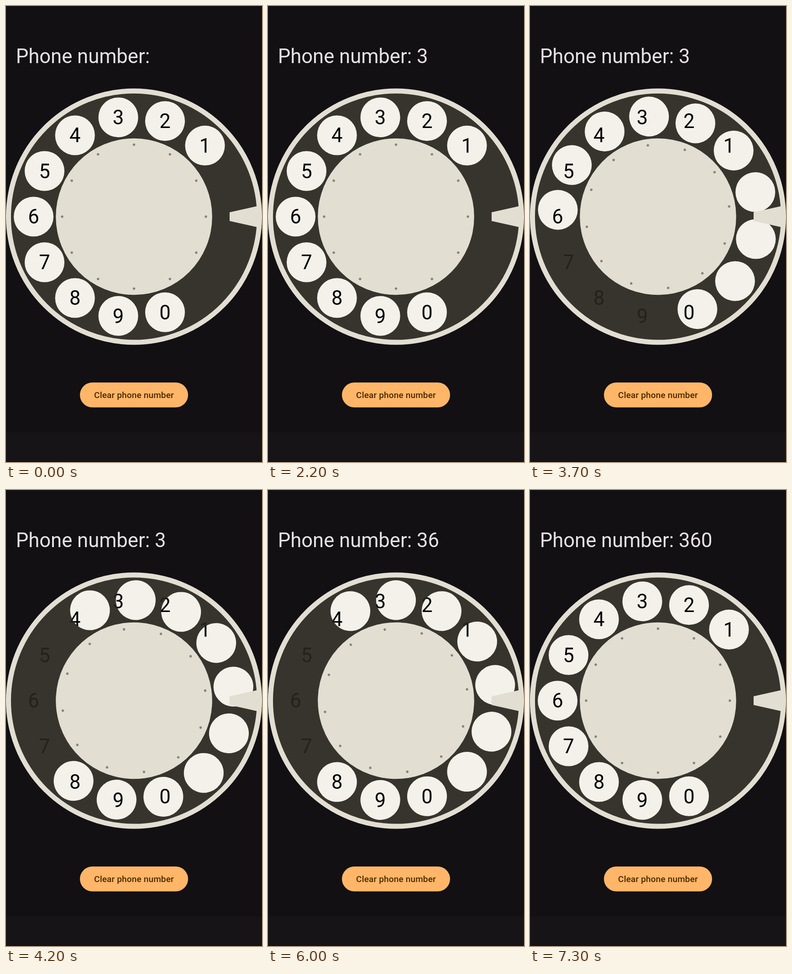
Recreate the animation shown at these times as an HTML page. Size 561 by 998 pixels, loop 8000 ms.

```html
<!DOCTYPE html>
<html lang="en">
<head>
<meta charset="utf-8">
<title>Rotary dialer</title>
<style>
  html, body { margin: 0; width: 100%; height: 100%; overflow: hidden; background: #121013; }
  svg { display: block; width: 100%; height: 100%; font-family: Roboto, sans-serif; }
  .large { font-size: 43.57px; }
  .middle { text-anchor: middle; }
  .button { font-size: 19.06px; font-weight: 500; letter-spacing: .136px; }
</style>
</head>
<body>
<svg viewBox="0 0 561 998">
  <rect width="561" height="998" fill="#121013"/>
  <rect y="933" width="561" height="63" fill="#161417"/>
  <text id="number" class="large" x="21.8" y="125" fill="#e6e1e5">Phone number:</text>

  <g transform="translate(280.5 461)">
    <circle r="275" fill="#f4f1ea"/>
    <g id="digits" class="large middle"></g>
    <g id="dial">
      <path id="plate" fill="#28241f" fill-opacity=".92" fill-rule="evenodd"/>
      <circle r="171.3" fill="#e2ded2"/>
      <g id="dots" fill="#87847c"></g>
    </g>
    <circle r="275.05" fill="none" stroke="#e2ded2" stroke-width="10.9"/>
    <path d="M209.5-9.5 270-23V23L209.5 9.5Z" fill="#e2ded2"/>
  </g>

  <rect x="162" y="824" width="237" height="54.5" rx="27.25" fill="#ffb668"/>
  <text class="button middle" x="280.5" y="857.8" fill="#4a2800">Clear phone number</text>
</svg>
<script>
  const LOOP = 8000, STEP = 100;
  const HOLE_ORBIT = 220, HOLE_RADIUS = 43.57, DOT_ORBIT = 157.5;
  const byId = id => document.getElementById(id);

  // Angles run anticlockwise from the finger stop.
  const polar = (radius, degrees) => {
    const a = degrees * Math.PI / 180;
    return [radius * Math.cos(a), -radius * Math.sin(a)];
  };
  const disc = (x, y, r) =>
    `M${x - r} ${y}a${r} ${r} 0 1 0 ${2 * r} 0a${r} ${r} 0 1 0 ${-2 * r} 0Z`;

  const holes = Array.from({ length: 10 }, (_, i) => polar(HOLE_ORBIT, 45 + 27 * i));
  byId('plate').setAttribute('d',
    disc(0, 0, 271) + holes.map(([x, y]) => disc(x, y, HOLE_RADIUS)).join(''));
  byId('digits').innerHTML = holes.map(([x, y], i) =>
    `<text x="${x}" y="${y + 15.4}">${(i + 1) % 10}</text>`).join('');
  byId('dots').innerHTML = Array.from({ length: 12 }, (_, i) => {
    const [x, y] = polar(DOT_ORBIT, 30 * i);
    return `<circle cx="${x}" cy="${y}" r="2.7"/>`;
  }).join('');

  // Each turn: finger drag from start to end, hold, then spring back on release.
  const turns = [
    { digit: 3, start: 900, end: 1700, release: 1850, back: 300, angle: 92, slowing: 1.445 },
    { digit: 6, start: 3100, end: 4200, release: 4350, back: 400, angle: 172, slowing: 1.733 },
    { digit: 0, start: 5500, end: 6700, release: 6950, back: 300, angle: 270, slowing: 2.597 }
  ];
  const progress = (t, from, to) => Math.min(1, Math.max(0, (t - from) / (to - from)));
  const ease = (u, rise, slowing) => 1 - (1 - u ** rise) ** slowing;

  const turnAngle = (turn, t) => {
    const drag = ease(progress(t, turn.start, turn.end), 1.3, turn.slowing);
    const back = ease(progress(t, turn.release, turn.release + turn.back), 2, 4);
    return turn.angle * drag * (1 - back);
  };

  function draw(now) {
    const t = Math.floor(now % LOOP / STEP) * STEP;
    const angle = turns.reduce((sum, turn) => sum + turnAngle(turn, t), 0);
    const dialed = turns.filter(turn => t >= turn.release).map(turn => turn.digit).join('');
    byId('dial').setAttribute('transform', `rotate(${angle})`);
    byId('number').textContent = `Phone number: ${dialed}`;
  }

  const began = performance.now();
  function tick() {
    draw(performance.now() - began);
    requestAnimationFrame(tick);
  }
  tick();
</script>
</body>
</html>
```
